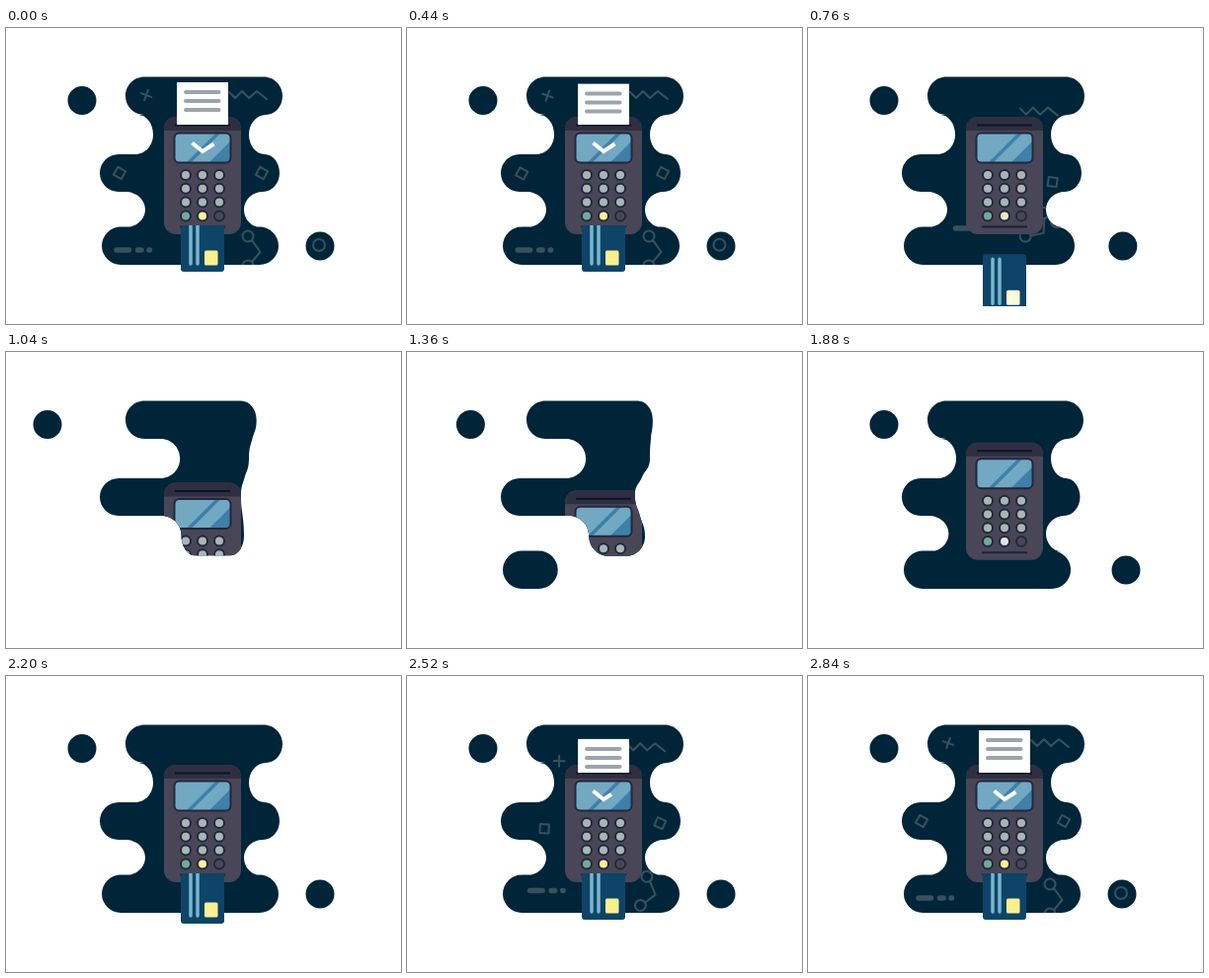
Write an HTML page that moves like this. It is 400x300 px and loops after 2.88 s.

```html
<!DOCTYPE html>
<html lang="en">
<head>
<meta charset="utf-8">
<title>Card terminal</title>
<style>
  html, body { margin: 0; width: 100%; height: 100%; overflow: hidden; background: #fff; }
  svg { display: block; width: 100%; height: 100%; }
</style>
</head>
<body>
<svg viewBox="0 0 400 300">
  <defs>
    <clipPath id="ink">
      <path id="body"/>
      <rect id="bar" x="97" y="201.500" height="38.500" rx="19.250"/>
      <circle id="dotL" cy="73.500" r="14.500"/>
      <circle id="dotR" cy="221" r="14.500"/>
    </clipPath>
    <clipPath id="above"><rect x="160" y="40" width="80" height="58"/></clipPath>
    <clipPath id="below"><rect x="160" y="200" width="80" height="82"/></clipPath>
    <clipPath id="glass"><rect x="171" y="107" width="56" height="29" rx="4"/></clipPath>
  </defs>

  <g clip-path="url(#ink)">
    <rect width="400" height="300" fill="#002539"/>
    <g id="decor" fill="none" stroke="#38505f" stroke-width="2" stroke-linejoin="round" stroke-linecap="round"></g>
    <g id="device">
      <rect x="160" y="90" width="78" height="119" rx="12" fill="#484657"/>
      <path d="M160 104V102A12 12 0 0 1 172 90H226A12 12 0 0 1 238 102V104Z" fill="#302f42"/>
      <path d="M171 98.500H227" stroke="#0b1428" stroke-width="2"/>
      <path d="M176 201.500H222" stroke="#1d2136" stroke-width="2"/>
      <g clip-path="url(#glass)">
        <rect x="170" y="106" width="58" height="31" fill="#3f80a8"/>
        <path d="M170 106H213L182 137H170ZM187 137L218 106H228V114L205 137Z" fill="#72a8c2"/>
      </g>
      <rect x="170.500" y="106.500" width="57" height="30" rx="5" fill="none" stroke="#21283e" stroke-width="2"/>
      <path id="tick" d="M188.500 116.500L199 125L210.500 117.500" pathLength="100" fill="none" stroke="#fff" stroke-width="4"/>
      <g id="keys" stroke="#23283c" stroke-width="2"></g>
    </g>
  </g>

  <g clip-path="url(#above)">
    <g id="paper">
      <rect x="173" y="55" width="52" height="48" fill="#fff"/>
      <path d="M182 65H215.500M182 74H215.500M182 83H215.500" stroke="#9ca5a9" stroke-width="4" stroke-linecap="round"/>
    </g>
  </g>
  <g clip-path="url(#below)">
    <g id="card">
      <rect x="177" y="189" width="44" height="58" rx="3" fill="#0d4467"/>
      <path d="M187 194V239M194 194V239" stroke="#79b5cc" stroke-width="3.500" stroke-linecap="round"/>
      <rect id="chip" x="201" y="225.500" width="13.500" height="15" rx="1.500"/>
    </g>
  </g>
</svg>

<script>
const LOOP = 2880;
const $ = id => document.getElementById(id);
const NS = 'http://www.w3.org/2000/svg';

function add(parent, tag, attrs) {
  const el = document.createElementNS(NS, tag);
  for (const name in attrs) el.setAttribute(name, attrs[name]);
  return parent.appendChild(el);
}

const mix = (a, b, k) => a + (b - a) * k;
const blend = (a, b, k) => `rgb(${a.map((v, i) => Math.round(mix(v, b[i], k)))})`;
const span = (t, start, len) => Math.min(1, Math.max(0, (t - start) / len));
const easeIn = u => u ** 3;
const easeOut = u => 1 - (1 - u) ** 3;
const easeBoth = u => u < .5 ? 4 * u ** 3 : 1 - 4 * (1 - u) ** 3;
const easeSine = u => (1 - Math.cos(Math.PI * u)) / 2;
const shift = (el, x, y) => el.setAttribute('transform', `translate(${x} ${y})`);

// Keypad
const keys = [];
for (let row = 0; row < 4; row++)
  for (let col = 0; col < 3; col++)
    keys.push(add($('keys'), 'circle', {
      cx: 182 + col * 17, cy: 149 + row * 13.8, r: 5, fill: '#a8b6b6'
    }));
keys[9].setAttribute('fill', '#73a99c');
keys[11].setAttribute('fill', '#484657');

// Ornaments: resting place, way to the hiding place, delay, tilt, spin on the way
const ring = (r, y = 0) => `M${r} ${y}A${r} ${r} 0 1 1 ${-r} ${y}A${r} ${r} 0 1 1 ${r} ${y}`;
const square = 'M-4.500 -4.500H4.500V4.500H-4.500Z';
const decor = [
  { x: 142, y: 68, dx: 50, dy: 75, wait: 110, tilt: 20, spin: -80, d: 'M-5.500 0H5.500M0 -5.500V5.500' },
  { x: 115, y: 147, dx: 75, dy: 24, wait: 140, tilt: 30, spin: -80, d: square },
  { x: 259, y: 147, dx: -45, dy: 36, wait: 0, tilt: 28, spin: -80, d: square },
  { x: 226, y: 70, dx: -40, dy: 60, wait: 10, d: 'M0 -5L6 1L13 -6L20 1L28 -6L38 2' },
  { x: 245, y: 211, dx: -14, dy: -52, wait: 65, spin: 85,
    d: ring(5.5) + 'M4 4L12.500 16L4 26' + ring(5.5, 30) },
  { x: 112, y: 225, dx: 80, dy: -47, wait: 70, w: 5.5, d: 'M0 0H12.500M21.500 0H25M33 0H33.500' },
  { x: 317, y: 220, dx: -110, dy: -40, wait: 100, d: ring(6) }
];
for (const o of decor)
  o.el = add($('decor'), 'path', { d: o.d, 'stroke-width': o.w || 2 });

// Contour nodes, open and shut: x, y, x, y
const TOP = 49.6;
const right = [
  [261, TOP, 234, TOP], [280, 69, 249, 69], [263, 88, 247, 88],
  [246, 108, 246, 108], [262, 128, 238, 127], [277, 147, 231, 145],
  [260, 166, 236, 166], [241, 184, 241, 187], [258, 202, 222, 207]
];
const lowerLeft = [[121, 202, 204, 207], [141, 184, 184, 186], [121, 166, 164, 166]];
const middleLeft = [[114, 166, 114, 166], [95, 147, 95, 147], [114, 128, 114, 128]];
const notch = [[131, 128, 161, 128], [149, 108, 181, 108], [134, 88, 161, 88]];
const topLeft = [[140, 88, 140, 88], [121, 69, 121, 69], [140, TOP, 140, TOP]];

// Quarter turns with tangents level and upright by turns;
// inner level tangents swing towards the flow of the line as it straightens
function turns(nodes, p) {
  const pts = nodes.map(n => [mix(n[0], n[2], p), mix(n[1], n[3], p)]);
  const handle = (i, j) => {
    const [x, y] = pts[i], [X, Y] = pts[j];
    if (i % 2) return [x, mix(y, Y, .55)];
    const far = pts[2 * i - j];
    if (!far) return [mix(x, X, .55), y];
    return [
      x + mix((X - x) * .55, (X - far[0]) * .2, p),
      y + mix(0, (Y - far[1]) * .2, p)
    ];
  };
  let d = 'L' + pts[0].join(' ');
  for (let i = 1; i < pts.length; i++)
    d += 'C' + [...handle(i - 1, i), ...handle(i, i - 1), ...pts[i]].join(' ');
  return d;
}

function contour(p) {
  return `M140 ${TOP}` + [right, lowerLeft, middleLeft, notch, topLeft]
    .map(part => turns(part, p)).join('') + 'Z';
}

function draw(t) {
  // Blob and terminal
  const p = 1.03 * (easeBoth(span(t, 740, 465)) - easeBoth(span(t, 1205, 845)));
  $('body').setAttribute('d', contour(p));
  shift($('device'), 0, 50 * p);

  const len = 1 - easeSine(span(t, 720, 310)) + easeSine(span(t, 1160, 870));
  $('bar').setAttribute('width', len > .001 ? mix(38, 179, len) : 0);

  // Loose drops
  const left = easeBoth(span(t, 770, 270)) - easeOut(span(t, 1130, 800));
  $('dotL').setAttribute('cx', 77 - 35 * left);
  const away = easeIn(span(t, 690, 290)) - easeOut(span(t, 1533, 588));
  $('dotR').setAttribute('cx', 318 + 59 * away);
  $('dotR').setAttribute('r', away > .999 ? 0 : 14.5);

  // Card, paper, tick
  const card = easeIn(span(t, 562, 265)) - easeOut(span(t, 1940, 400));
  shift($('card'), 0, 95 * card);
  const paper = easeIn(span(t, 330, 340)) - easeOut(span(t, 2310, 500));
  shift($('paper'), 0, 46 * paper);
  const tick = 1 - span(t, 480, 160) + span(t, 2390, 155);
  $('tick').setAttribute('stroke-dasharray', `${100 * tick} 200`);
  $('tick').setAttribute('visibility', tick > 0 ? 'visible' : 'hidden');

  const pale = Math.min(1, 1.5 * card);
  keys[10].setAttribute('fill', blend([250, 243, 150], [222, 228, 224], pale));
  $('chip').setAttribute('fill', blend([250, 240, 142], [255, 255, 255], pale));

  for (const o of decor) {
    const k = easeIn(span(t, 458 - o.wait, 480)) - easeOut(span(t, 2230 + o.wait, 480));
    const turn = (o.tilt || 0) + (o.spin || 0) * k;
    o.el.setAttribute('transform', `translate(${o.x + o.dx * k} ${o.y + o.dy * k}) rotate(${turn})`);
    o.el.setAttribute('visibility', k < 1 ? 'visible' : 'hidden');
  }
}

const begin = performance.now();
function tickFrame() {
  draw((performance.now() - begin) % LOOP);
  requestAnimationFrame(tickFrame);
}
tickFrame();
</script>
</body>
</html>
```
